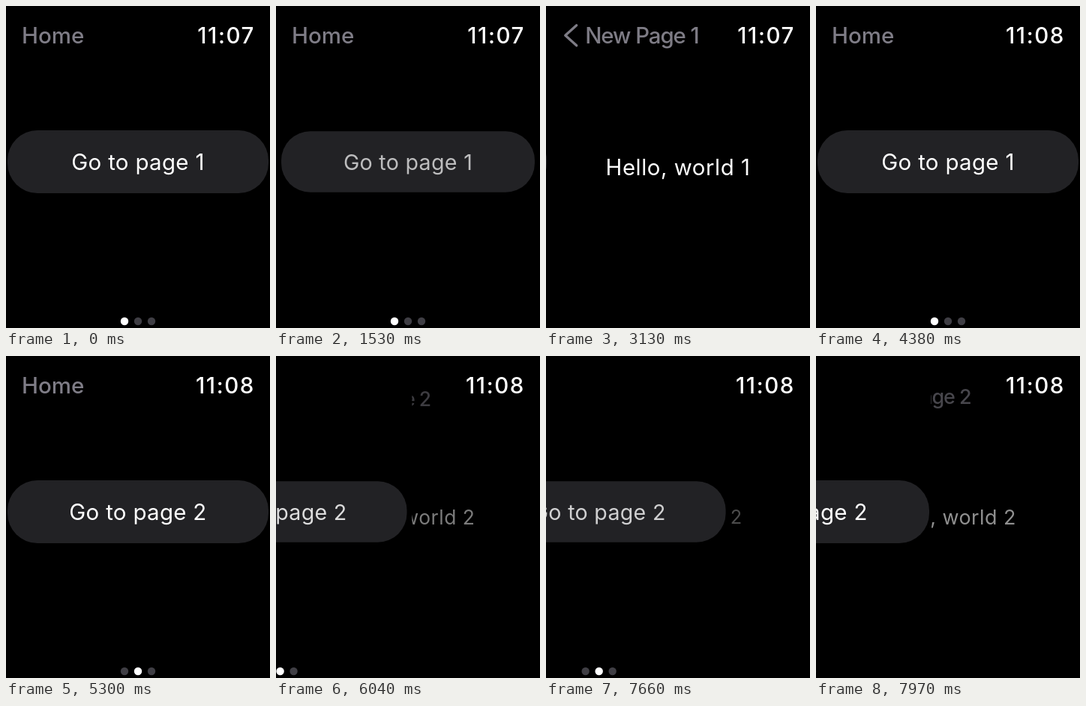
These frames come from a looping animation (352 by 430 pixels, 8 s). An HTML page:

```html
<!DOCTYPE html>
<html lang="en">
<head>
<meta charset="utf-8">
<title>Watch navigation</title>
<style>
  /* push: detail shown, press: button held, swipe: tab offset, tab and minute: switches */
  @property --push { syntax: "<number>"; inherits: true; initial-value: 0; }
  @property --press { syntax: "<number>"; inherits: true; initial-value: 0; }
  @property --swipe { syntax: "<number>"; inherits: true; initial-value: 0; }
  @property --tab { syntax: "<number>"; inherits: true; initial-value: 0; }
  @property --minute { syntax: "<number>"; inherits: true; initial-value: 0; }

  html, body { margin: 0; width: 100%; height: 100%; overflow: hidden; background: #000; }

  .stage {
    display: block;
    width: 352px;
    height: 430px;
    font: 400 29.5px Inter, Roboto, sans-serif;
    letter-spacing: .5px;
    animation: 8s ease-in-out infinite;
    animation-name: push, press, swipe;
  }
  .switches {
    animation: 8s step-end infinite;
    animation-name: tab, minute;
  }

  text { fill: #fff; }
  .title { fill: #7f7d87; font-weight: 500; letter-spacing: 0; }
  .back { fill: none; stroke: #7f7d87; stroke-width: 3.3; stroke-linecap: round; stroke-linejoin: round; }
  .tight { letter-spacing: -1.1px; }
  .mid { text-anchor: middle; }
  .clock { font-weight: 500; letter-spacing: 1.6px; text-anchor: end; }

  .home { transform: translateX(calc(var(--push) * -352px)); }
  .detail {
    opacity: var(--push);
    transform: scale(calc(.8 + .2 * var(--push)));
    transform-origin: 176px 215px;
  }
  .tabs { transform: translateX(calc(var(--swipe) * -352px)); }
  .button {
    letter-spacing: .3px;
    transform: scale(calc(1 - .029 * var(--press)));
    transform-origin: 176px 208px;
  }
  .button rect { fill: #222225; }
  .button text { opacity: calc(1 - .3 * var(--press) * (1 - var(--push))); }
  .dots { fill: #3f3e44; }
  .dots .on { fill: #fff; transform: translateX(calc(var(--tab) * 18px)); }

  .one { opacity: calc(1 - var(--tab)); }
  .two { opacity: var(--tab); }
  .early { opacity: calc(1 - var(--minute)); }
  .late { opacity: var(--minute); }

  @keyframes push {
    0%, 28% { --push: 0; }
    29.375%, 29.625% { --push: 1; }
    30.875%, 35.25% { --push: 0; }
    38.25%, 38.9375% { --push: 1; }
    41.9375%, 48.25% { --push: .015; }
    49.375%, 74.04% { --push: 0; }
    77.04%, 77.7% { --push: 1; }
    80.9%, 94.625% { --push: 0; }
    97.625% { --push: 1; }
    98.3125% { --push: 1; animation-timing-function: ease-in; }
    99.625% { --push: .57; animation-timing-function: linear; }
    100% { --push: .43; }
  }
  @keyframes press {
    0%, 18% { --press: 0; }
    19.125%, 28.9% { --press: 1; }
    29.375%, 30.875% { --press: 0; }
    31.75%, 38% { --press: 1; }
    38.25%, 66.25% { --press: 0; }
    69%, 76.9% { --press: 1; }
    77%, 88.125% { --press: 0; }
    90.875%, 97.5% { --press: 1; }
    97.625%, 100% { --press: 0; }
  }
  @keyframes swipe {
    0%, 54.75% { --swipe: 0; }
    59.75%, 100% { --swipe: 1; }
  }
  @keyframes tab {
    0% { --tab: 0; }
    57.25%, 100% { --tab: 1; }
  }
  @keyframes minute {
    0% { --minute: 0; }
    48.25%, 100% { --minute: 1; }
  }
</style>
</head>
<body>
<svg class="stage" viewBox="0 0 352 430">
  <rect width="352" height="430"/>
  <g class="switches">
    <g class="detail">
      <path class="back" d="M40.5 25.5L25.5 39L40.5 52.5"/>
      <g class="one">
        <text class="title tight" x="52" y="50">New Page 1</text>
        <text class="mid" x="176" y="226">Hello, world 1</text>
      </g>
      <g class="two">
        <text class="title tight" x="52" y="50">New Page 2</text>
        <text class="mid" x="176" y="226">Hello, world 2</text>
      </g>
    </g>

    <g class="home">
      <!-- the inner viewport hides the neighbouring tab -->
      <svg width="352" height="430" overflow="hidden">
        <rect width="352" height="430"/>
        <text class="title" x="21" y="50">Home</text>
        <g class="tabs">
          <g class="button">
            <rect x="2" y="166" width="348" height="84" rx="40"/>
            <text class="mid" x="176" y="219">Go to page 1</text>
          </g>
          <g transform="translate(352 0)">
            <g class="button">
              <rect x="2" y="166" width="348" height="84" rx="40"/>
              <text class="mid" x="176" y="219">Go to page 2</text>
            </g>
          </g>
        </g>
        <g class="dots">
          <circle cx="158" cy="421" r="5.2"/>
          <circle cx="176" cy="421" r="5.2"/>
          <circle cx="194" cy="421" r="5.2"/>
          <circle class="on" cx="158" cy="421" r="5.2"/>
        </g>
      </svg>
    </g>

    <g class="clock">
      <text class="early" x="332" y="50">11:07</text>
      <text class="late" x="332" y="50">11:08</text>
    </g>
  </g>
</svg>
</body>
</html>
```
